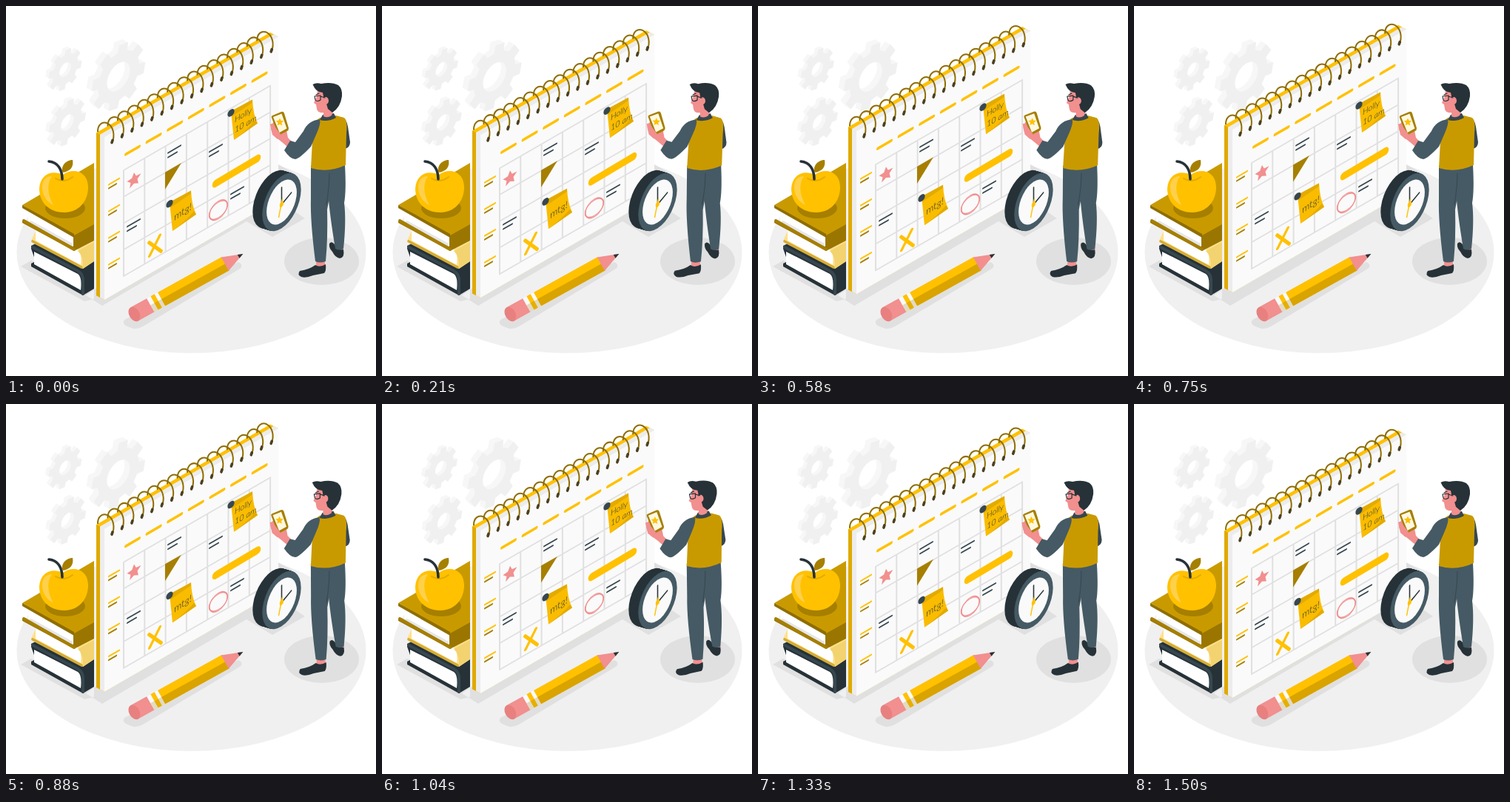
An HTML page for the animation above (1540 ms loop, 500 px wide and 500 px high).

```html
<!DOCTYPE html>
<html lang="en">
<head>
<meta charset="utf-8">
<title>Planner</title>
<style>
html, body { margin: 0; height: 100%; overflow: hidden; background: #fff; }
svg { display: block; width: 100%; height: 100%; }
.line { fill: none; stroke-linecap: round; stroke-linejoin: round; }
text { font: italic 300 11px Lato, sans-serif; fill: #263238; }
</style>
</head>
<body>
<svg viewBox="0 0 500 500">
  <ellipse cx="250.500" cy="333" rx="236" ry="136" fill="#f0f0f0"/>
  <g fill="#e0e0e0">
    <path d="M20 352L34 344 119 380V396L106 399ZM108 391L130 405 325 291 360 312 404 287 376 268V234L388 225 366 213Z"/>
    <path d="M160 424Q156 430 164 433L172 436Q178 437 185 433L316 355Q322 350 314 346Z"/>
    <ellipse cx="426.500" cy="345" rx="50.500" ry="32"/>
  </g>
  <g id="gears"/>

  <g id="books">
    <path d="M34 324L50 316 119 345V382L104 391 34 352V348L40 345 34 328Z" fill="#263238"/>
    <path d="M38 332L97 362Q103 366 101 384L38 349Z" fill="#fff"/>
    <path d="M36 326L97 358Q104 362 104 370V389" class="line" stroke="#37474f" stroke-width="4"/>
    <path d="M34 317L42 300 119 317V345L104 355 36 320Z" fill="#ffe08a"/>
    <path d="M40 297L96 328Q103 333 101 350L40 317Z" fill="#fff"/>
    <path d="M97 331L119 319V345L104 355Q105 338 97 331Z" fill="#f3d36f"/>
    <path d="M36 318L102 353" class="line" stroke="#d5ad35" stroke-width="3.600"/>
    <path d="M22 290L92 309 119 294V317L92 331 22 293Z" fill="#9a7600"/>
    <path d="M30 276L91 310V325L30 291Z" fill="#fff"/>
    <path d="M34 290L90 321V325L30 292Z" fill="#e6e6e6"/>
    <path d="M24 290L92 329" class="line" stroke="#a67f00" stroke-width="4"/>
    <path d="M22 269L119 212V295L92 310Z" fill="#c99a00"/>
    <path d="M22 269L92 308V313L22 273Z" fill="#8f6d00"/>
  </g>

  <g id="apple">
    <ellipse cx="80" cy="273" rx="27" ry="14" fill="#a67f00"/>
    <path d="M77 228C90 218 111 223 111 245C111 265 97 279 79 279C59 279 45 266 45 247C46 227 62 221 77 228Z" fill="#ffc100"/>
    <path d="M49 247C48 236 54 230 62 230C54 242 57 256 64 269C54 264 50 256 49 247Z" fill="#ffd04a"/>
    <path d="M67 233Q78 240 90 231" class="line" stroke="#e3ab00" stroke-width="2"/>
    <path d="M76 234C76 221 70 211 58 210" class="line" stroke="#263238" stroke-width="3.600"/>
    <path d="M76 225C74 213 84 208 90 208C92 218 86 224 76 225Z" fill="#a67f00"/>
  </g>

  <g id="calendar">
    <g id="sheet" transform="matrix(1 -.577 0 1 133 397)">
      <path d="M0 0L-11-12V-232H224L235-220V0Z" fill="#ffc100"/>
      <path d="M-11-232L-6-226.700V-6.700L-11-12Z" fill="#e0aa00"/>
      <path d="M0 0L-6-6.700V-226.700H229L235-220V0Z" fill="#ececec"/>
      <path d="M0-220H235V0H0Z" fill="#fafafa"/>
      <path id="grid" class="line" stroke="#e0e0e0" stroke-width="2"/>
      <path d="M82-125H104L82-102Z" fill="#a67f00"/>
      <path d="M151-70.500L206-71.500" class="line" stroke="#ffc100" stroke-width="10.500"/>
      <path d="M60-43L77-21M75-44L61-24" class="line" stroke="#ffc100" stroke-width="4"/>
      <g class="line" stroke="#f28f8f" stroke-width="1.300">
        <circle cx="154" cy="-32.500" r="12"/>
        <ellipse cx="154" cy="-32.500" rx="12.500" ry="10.500"/>
      </g>
    </g>
    <g id="rings" class="line"/>
  </g>

  <g id="clock">
    <g id="clockSide" fill="#263238"/>
    <g transform="matrix(.77 -.5 0 1.040 372.500 265)">
      <circle r="34" fill="#455a64"/>
      <circle r="26.500" fill="#fafafa"/>
      <g class="line" stroke-width="2">
        <path d="M0 3V-19M0 3L17-4" stroke="#263238"/>
        <path d="M1-3L-5 17" stroke="#ffc100"/>
      </g>
      <circle cy="3" r="3.500" fill="#ffc100"/>
    </g>
  </g>

  <g id="pencil" transform="translate(176 415) rotate(-29)">
    <path d="M-3-10.500H23V10.500H-3Z" fill="#f28f8f"/>
    <ellipse cx="-3" rx="7" ry="10.500" fill="#e88080"/>
    <path d="M22-10.500H40V10.500H22Z" fill="#fafafa"/>
    <path d="M28-10.500H34V10.500H28Z" fill="#ffc100"/>
    <path d="M22 0H40V10.500H22Z" fill="#8f6d00" opacity=".22"/>
    <path d="M39-10.500H138V10.500H39Z" fill="#ffc100"/>
    <path d="M39 0H140L138 10.500H39Z" fill="#d9a300"/>
    <path d="M137-10.500L165 0 137 10.500Z" fill="#f28f8f"/>
    <path d="M158-2.700L165 0 158 2.700Z" fill="#263238"/>
  </g>

  <g id="man">
    <path d="M452 150Q460 151 462 163L465 184Q465 191 458 193L452 186Z" fill="#37474f"/>
    <path d="M445 323L456 323 456 332H447ZM419 342H431V354H419Z" fill="#f28f8f"/>
    <path d="M437 321Q440 317 444 322Q448 331 456 329Q458 340 451 341Q445 340 441 332Q436 327 437 321Z" fill="#263238"/>
    <path d="M432 349Q433 358 430 361L415 364Q405 368 399 366Q393 363 397 358Q410 356 418 350Q424 354 432 349Z" fill="#263238"/>
    <path d="M431 216L458 215Q460 250 457 266Q460 290 456 328Q450 331 445 328Q437 280 435 250Z" fill="#455a64"/>
    <path d="M412 216L442 222Q439 250 434 275Q435 315 432 345Q424 348 418 345Q411 290 412 260Z" fill="#455a64"/>
    <path d="M437 226Q437 245 433 268" class="line" stroke="#37474f"/>
    <path d="M424 151L446 148 457 151Q462 155 460 172L459 215Q435 226 412 219L414 182Q414 158 424 151Z" fill="#c99a00"/>
    <path d="M424 154L428 147 443 145 446 151Q435 157 424 154Z" fill="#37474f"/>
    <path d="M380 190L373 184 364 177Q357 169 358 162L362 156 366 165 379 168 381 178 387 184Z" fill="#f28f8f"/>
    <path d="M424 153Q408 155 402 169L391 184 384 182 376 195Q384 207 391 207Q397 206 412 190L419 174Q426 159 424 153Z" fill="#455a64"/>
    <path d="M360 148L372 143Q375 142 376 145L382 165Q382 168 380 169L370 174Q368 174 367 172L359 151Q358 149 360 148Z" fill="#a67f00"/>
    <path d="M361 150L372.500 145.500 379.500 165.500 369.500 171Z" fill="#fff8e1"/>
    <path id="phoneStar" fill="#ffc100" transform="translate(370 157)"/>
    <path d="M357 160Q361 157 364 164L371 173 367 180 360 174Z" fill="#f28f8f"/>
    <path d="M421 112L437 112 443 140 440 148Q434 152 429 149L429 144Q421 145 420 139L419 133 416 131 420 122Z" fill="#f28f8f"/>
    <path d="M414.500 106Q419 103 426 105Q440 102 449 107Q455 112 454 122Q452 137 441 144L435 139 433 132Q428 130 429 122L428 117Q419 117 414.500 106Z" fill="#263238"/>
    <ellipse cx="432" cy="128" rx="4" ry="5" fill="#f28f8f"/>
    <path d="M417 122L425 121 425 127Q420 130 418 127ZM425 122L431 124M419 120L423 118" class="line" stroke="#263238" stroke-width="1.200"/>
  </g>
</svg>
<script>
const $ = id => document.getElementById(id);
const add = (parent, markup) => parent.insertAdjacentHTML('beforeend', markup);
const polar = (r, a) => `${(r * Math.sin(a)).toFixed(2)} ${(-r * Math.cos(a)).toFixed(2)}`;

function star(r) {
  const points = Array.from({ length: 10 }, (_, i) => polar(i % 2 ? r * 0.48 : r, i * Math.PI / 5));
  return `M${points.join('L')}Z`;
}

function gear(x, y, r, hole) {
  const points = [];
  for (let i = 0; i < 8; i++) {
    const a = i * Math.PI / 4 + 0.2;
    points.push(polar(r * 0.77, a - 0.24), polar(r, a - 0.17), polar(r, a + 0.17), polar(r * 0.77, a + 0.24));
  }
  const d = `M${points.join('L')}ZM${-hole} 0a${hole} ${hole} 0 1 0 ${2 * hole} 0a${hole} ${hole} 0 1 0 ${-2 * hole} 0Z`;
  const layer = (shift, fill) => `<path d="${d}" fill="${fill}" fill-rule="evenodd"
    transform="matrix(.866 -.5 0 1 ${x - shift} ${y - shift * 0.58})"/>`;
  for (let s = r / 6; s > 0; s--) add($('gears'), layer(s, '#f7f7f7'));
  add($('gears'), layer(0, '#f0f0f0'));
}

gear(80, 86, 26, 9);
gear(152, 95.5, 42, 18);
gear(83, 157.5, 29, 10);
$('phoneStar').setAttribute('d', star(5.5));

for (let s = 13; s > 0; s--)
  add($('clockSide'), `<circle r="34" transform="matrix(.77 -.5 0 1.04 ${372.5 - s} ${265 - s * 0.3})"/>`);

const sheet = $('sheet');
const stroke = (d, color, width) =>
  add(sheet, `<path class="line" d="${d}" stroke="${color}" stroke-width="${width}"/>`);

let grid = '';
for (let i = 0; i < 8; i++) grid += `M${26 + i * 28.3}-160V-17`;
for (let i = 0; i < 5; i++) grid += `M26 ${-17 - i * 35.75}H224`;
$('grid').setAttribute('d', grid);

for (let i = 0; i < 7; i++) stroke(`M29 -180m${i * 28.6} 0h18`, '#ffc100', 4);
for (let i = 0; i < 4; i++) {
  stroke(`M6 ${-152.3 + i * 36}h14`, '#ffc100', 2.2);
  stroke(`M6 ${-147.3 + i * 36}h10`, '#a67f00', 2.2);
}
for (const [x, y] of [[86, -149], [142, -118], [31, -81], [171, -44]])
  stroke(`M${x} ${y}h17m-17 6h12`, '#37474f', 2);
add(sheet, `<path d="${star(10)}" fill="#f28f8f" transform="translate(40 -139)"/>`);

function note(x, y, lines) {
  add(sheet, `<g transform="translate(${x} ${y})">
    <path d="M0 0L29 1Q30 22 36 37L4 41Q2 20 0 0Z" fill="#f9bc00"/>
    <path d="M4 41L36 37 33 31Q22 38 4 41Z" fill="#e3ab00"/>
    <path d="M0 0L29 1V5L1 8Z" fill="#e3ab00"/>
    ${lines}<circle cy="2" r="4.600" fill="#37474f"/></g>`);
}
note(171, -156, '<text x="5" y="18">Holly</text><text x="5" y="32">10 am</text>');
note(88, -81, '<text x="4" y="29" transform="rotate(-5)" style="font-size:13px">mtg!</text>');

for (let i = 0; i < 17; i++) {
  add($('rings'), `<g transform="translate(${143 + i * 13.45} ${185.5 - i * 7.68})">
    <path d="M-19-16C-19-25-13-30-6-27C2-23 5-11 0 0" stroke="#8f6d00" stroke-width="2"/>
    <path d="M1-4L0-1" stroke="#4a4022" stroke-width="3.600"/></g>`);
}

// 37 steps per loop: the sheet floats, the man and the gears sway
const LOOP = 1540, STEPS = 36;
const start = performance.now();
function draw(now) {
  const t = Math.max(0, now - start) % LOOP;
  const p = Math.min(STEPS, Math.floor((t + 3) * (STEPS + 1) / LOOP)) / STEPS;
  const lift = 10 * (1 - Math.abs(2 * p - 1));
  const angle = p < 0.25 ? 4 * p : p < 0.75 ? 2 - 4 * p : 4 * p - 4;
  $('calendar').setAttribute('transform', `translate(0 ${-lift})`);
  $('man').setAttribute('transform', `rotate(${angle} 411 235)`);
  $('gears').setAttribute('transform', `rotate(${angle} 121 117)`);
  requestAnimationFrame(draw);
}
draw(start);
</script>
</body>
</html>
```
